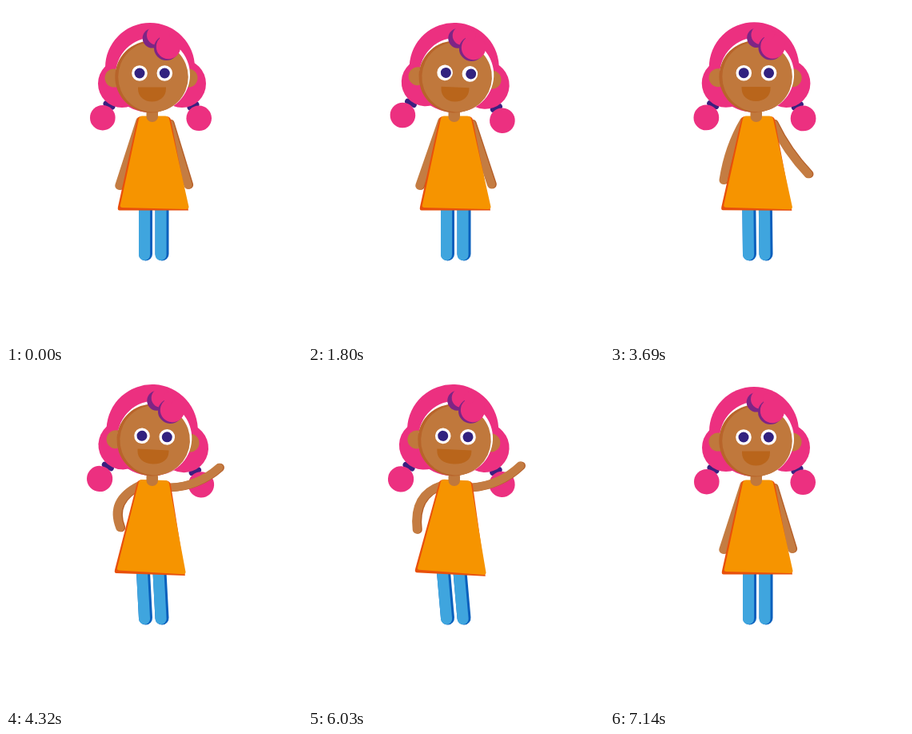
An HTML page for the animation above (7170 ms loop, 370x420 px).

```html
<!DOCTYPE html>
<html lang="en">
<head>
<meta charset="utf-8">
<title>Waving girl</title>
<style>
html, body { margin: 0; width: 100%; height: 100%; overflow: hidden; background: #fff; }
svg { display: block; width: 370px; height: 420px; }
.pink { fill: #ec3080; }
.plum { fill: #7d2585; }
.navy { fill: #32227f; }
.skin { fill: #c0783c; }
.arm, .tie { fill: none; stroke: #c47c42; stroke-width: 10.5; stroke-linecap: round; }
.arm.edge { stroke: #b6602a; }
.tie { stroke: #3a207f; stroke-width: 7; }
.leg { fill: #3fa5de; }
.leg.edge { fill: #0a60bd; }
</style>
</head>
<body>
<svg viewBox="0 0 370 420">
  <g id="hair">
    <path class="tie" id="tieL" d="M125 122L133 126"/>
    <path class="tie" id="tieR" d="M238 123L230 127"/>
    <circle class="pink" cx="180" cy="77" r="56"/>
    <circle class="pink" cx="145" cy="97" r="30"/>
    <circle class="pink" cx="220" cy="97" r="30"/>
    <circle class="pink" id="puffL" cx="120.800" cy="139.700" r="15.800"/>
    <circle class="pink" id="puffR" cx="241.200" cy="140.300" r="15.800"/>
  </g>
  <g id="legL">
    <rect class="leg edge" x="166" y="240" width="17" height="78.500" rx="8.500"/>
    <rect class="leg" x="166" y="240" width="14" height="78" rx="7"/>
  </g>
  <g id="legR">
    <rect class="leg edge" x="186.500" y="240" width="17" height="78.500" rx="8.500"/>
    <rect class="leg" x="186.500" y="240" width="14" height="78" rx="7"/>
  </g>
  <path class="arm edge" id="edgeL" transform="translate(1.500 0)"/>
  <path class="arm" id="armL"/>
  <path class="arm edge" id="edgeR" transform="translate(1.500 0)"/>
  <path class="arm" id="armR"/>
  <g id="dress">
    <path fill="#e8500c" d="M169 138H200Q205 138 206 142L228 255.500H142Q139 255.500 140 251L164 142Q165 138 169 138Z"/>
    <path fill="#f69400" d="M170 137.500H199Q203 137.500 204 141L228.500 251Q228.500 254 225 254L145 252Q142 251.500 143 248.500L166 141Q167 137.500 170 137.500Z"/>
  </g>
  <rect class="skin" x="175.500" y="126" width="14.500" height="19" rx="7"/>
  <g id="head">
    <circle class="skin" cx="135" cy="90" r="11.500"/>
    <circle class="skin" cx="228" cy="90" r="11.500"/>
    <circle fill="#fff" cx="183.500" cy="86" r="46.500"/>
    <circle fill="#b8642a" cx="181.300" cy="88.500" r="45"/>
    <circle class="skin" cx="184" cy="88.700" r="43.800"/>
    <g id="eyes">
      <g fill="#fff"><circle cx="167" cy="84" r="9.800"/><circle cx="198.300" cy="84" r="9.800"/></g>
      <g class="navy" id="pupils"><circle cx="167" cy="84" r="6.500"/><circle cx="198.300" cy="84" r="6.500"/></g>
    </g>
    <path id="mouth" fill="#b9651b"/>
  </g>
  <g id="bangs">
    <circle class="plum" cx="183" cy="40.300" r="12.300"/>
    <circle class="pink" cx="188" cy="36.500" r="12"/>
    <circle class="plum" cx="200.500" cy="52.500" r="15.500"/>
    <circle class="pink" cx="203" cy="51" r="15.200"/>
    <circle class="pink" cx="198" cy="36" r="7"/>
  </g>
</svg>
<script>
const LOOP = 7170, IDLE = 3600;
const part = {};
document.querySelectorAll('[id]').forEach(el => part[el.id] = el);
const set = (id, name, value) => part[id].setAttribute(name, value);
const move = (id, value) => set(id, 'transform', value);
const mix = (a, b, p) => a + (b - a) * p;

// Eased value from a list of [time, value] keys.
function track(t, keys) {
  if (t <= keys[0][0]) return keys[0][1];
  for (let i = 1; i < keys.length; i++) {
    const [t0, a] = keys[i - 1], [t1, b] = keys[i];
    if (t < t1) return mix(a, b, .5 - .5 * Math.cos(Math.PI * (t - t0) / (t1 - t0)));
  }
  return keys[keys.length - 1][1];
}

const LOOK = [[250, 0], [650, -1], [1500, -1], [1950, 1], [2950, 1], [3400, 0]];
const POSE = [[3420, 0], [4230, 1], [6030, 1], [6900, 0]];
const TILT = [[3600, 0], [4250, 2.8], [6030, 2.5], [7100, 0]];
const LEAN = [[3500, 0], [4250, 2], [5100, 2], [6030, 3], [7000, 0]];
const LEGS = [[3450, 0], [4250, -3], [5100, -3], [6030, -5], [7000, 0]];
const HIP = [[5100, 0], [6030, 1], [6900, 0]];
const WAVE = [[3480, 17], [4230, 114], [4680, 92], [5130, 110], [5580, 92], [6030, 114], [6800, 17]];

function drawArm(side, from, bend, hand) {
  const d = `M${from}Q${bend} ${hand}`;
  set('arm' + side, 'd', d);
  set('edge' + side, 'd', d);
}

function draw(t) {
  const idle = t < IDLE;
  const sway = idle ? Math.sin(2 * Math.PI * t / IDLE) : 0;
  const drift = idle ? Math.sin(Math.PI * t / IDLE) ** 2 : 0;
  const pose = track(t, POSE), hip = track(t, HIP);
  const tilt = 2.8 * drift + track(t, TILT);

  // The hair follows the head and swells a little while waving.
  const turn = `rotate(${tilt} 183 133)`;
  const grow = 1 + .02 * pose;
  move('head', `translate(${-hip} ${-pose})${turn}`);
  move('bangs', `translate(${pose - 1.5 * hip} ${-2 * pose})${turn}`);
  move('hair', `translate(${-1.3 * hip} ${-1.5 * pose})${turn}translate(183 90)scale(${grow})translate(-183 -90)`);
  const spread = .75 * tilt;
  move('puffL', `translate(${-spread} 0)`);
  move('puffR', `translate(${spread} ${.5 * pose})`);
  move('tieL', `translate(${-spread / 2} 0)`);
  move('tieR', `translate(${spread / 2} 0)`);

  const look = track(t, LOOK);
  move('eyes', `translate(${3.4 * look + .6 * pose} 0)`);
  move('pupils', `translate(${2.5 * look} 0)`);
  const wide = 17.5 + 2 * pose + 2 * hip, top = 101.5 - pose;
  set('mouth', 'd', `M${182.5 - wide} ${top}h${2 * wide}v2c0 10 -8 16 ${-wide} 16s${-wide} -6 ${-wide} -16z`);

  move('dress', `rotate(${2 * sway + track(t, LEAN)} 184 138)`);
  const legs = track(t, LEGS);
  move('legL', `rotate(${legs} 174.5 310)`);
  move('legR', `rotate(${legs} 195 310)`);

  // Left arm hangs, then rests on the hip.
  const handL = [
    mix(141.5 - 6 * sway - 2 * drift, mix(142.5, 136, hip), pose),
    mix(224.5 - 3.5 * sway, mix(197, 199.5, hip), pose)];
  drawArm('L', [167.5, 144],
    [mix((167.5 + handL[0]) / 2, mix(129, 131, hip), pose), mix((144 + handL[1]) / 2, mix(163, 156, hip), pose)],
    handL);

  // Right arm swings up around the shoulder, sagging as it lifts.
  const angle = (track(t, WAVE) + 1.3 * (sway + drift)) * Math.PI / 180;
  const along = [Math.sin(angle), Math.cos(angle)];
  const reach = mix(80, 67, pose), sag = 12 * Math.sqrt(pose);
  drawArm('R', [204, 147],
    [204 + along[0] * reach / 2 - along[1] * sag, 147 + along[1] * reach / 2 + along[0] * sag],
    [204 + along[0] * reach, 147 + along[1] * reach]);
}

const start = performance.now();
function frame() {
  draw((performance.now() - start) % LOOP);
  requestAnimationFrame(frame);
}
frame();
</script>
</body>
</html>
```
